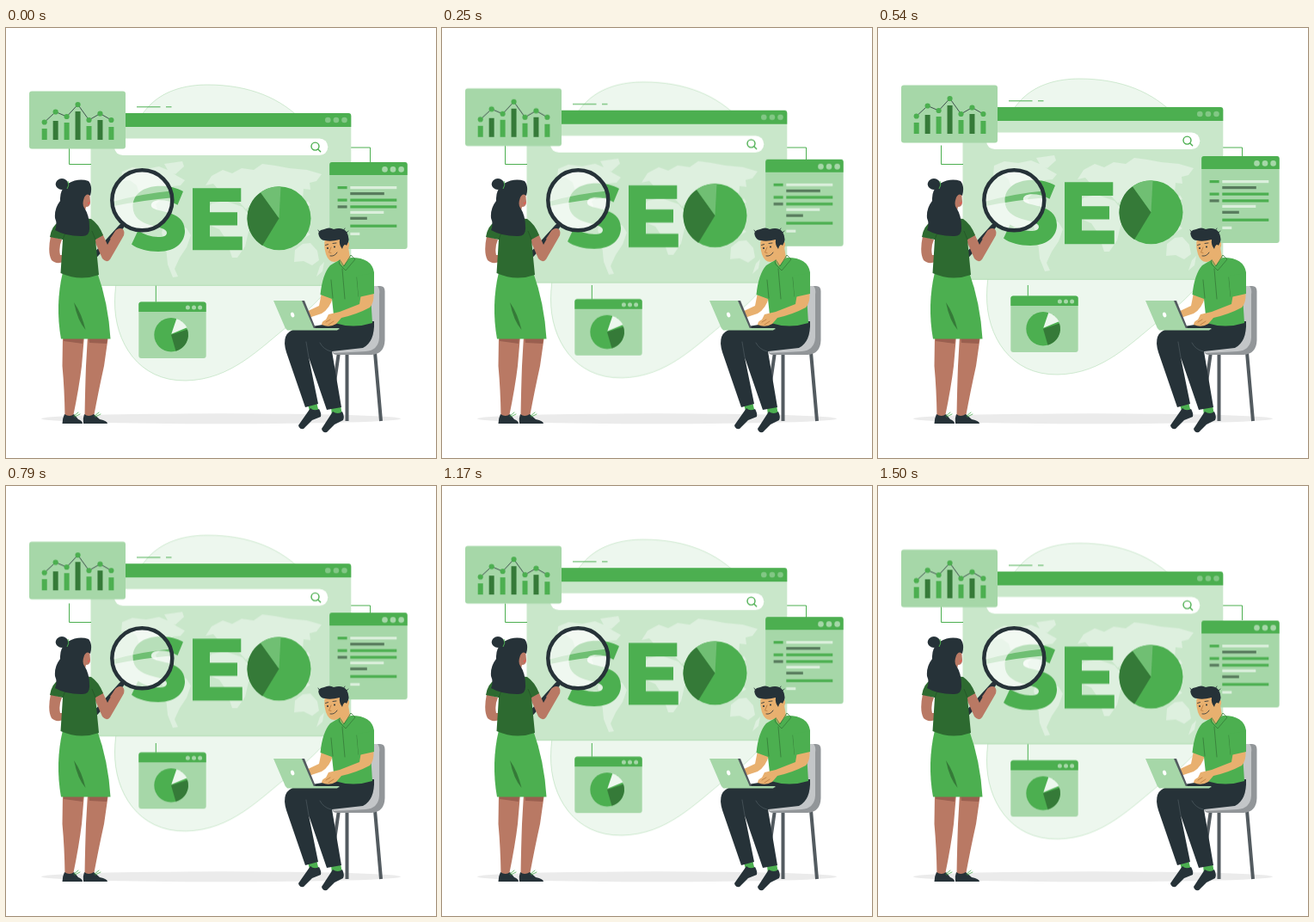
Recreate the animation shown at these times as an HTML page. Size 500x500 px, loop 1.54 s.

```html
<!DOCTYPE html>
<html lang="en">
<head>
<meta charset="utf-8">
<title>Search analytics</title>
<style>
html, body { margin: 0; width: 100%; height: 100%; overflow: hidden; background: #fff; }
svg { display: block; width: 100vw; height: 100vh; }
.float { animation: float 1540ms linear infinite; }
@keyframes float {
  0% { transform: translateY(0); }
  47.4% { transform: translateY(-9.5px); }
  97.4% { transform: translateY(.5px); }
  100% { transform: translateY(0); }
}
.g { fill: #4caf50; }
.d { fill: #357a38; }
.card { fill: #a6d7a8; }
.ink { fill: #263238; }
.skin { fill: #b97964; }
.tan { fill: #e8b06f; }
.dots { fill: #82c785; }
.line { fill: none; stroke: #4caf50; stroke-width: 1; }
.icon { fill: none; stroke: #4caf50; stroke-width: 1.4; stroke-linecap: round; }
.thin { fill: none; stroke-width: .8; stroke-linecap: round; stroke-linejoin: round; }
</style>
</head>
<body>
<svg viewBox="0 0 500 500">
  <defs>
    <clipPath id="lens"><circle cx="158.300" cy="200.300" r="35"/></clipPath>
  </defs>
  <ellipse cx="250" cy="454.300" rx="209" ry="6" fill="#ebebeb"/>

  <g class="float">
    <path fill="#edf7ee" stroke="#a6d7a8" stroke-width=".5" d="M234 66C284 66 320 82 346 109C375 140 404 185 401 238C399 283 368 316 331 344C294 373 262 409 209 410C154 411 126 365 126.500 318C127 270 148 236 142 190C137 145 144 112 169 88C186 72 210 66 234 66Z"/>
    <path class="line" d="M152 91.800H179.500M186 91.800H192.500"/>
  </g>

  <path class="line" d="M174.300 299V322M400 139H423.500V156"/>

  <g class="float">
    <rect x="98.500" y="102" width="302.800" height="197.500" fill="#c9e7ca"/>
    <path d="M98.500 299.300H401.300" stroke="#a6d7a8" stroke-width=".7"/>
    <path class="g" d="M98.500 115V102Q98.500 99 101.500 99H398.300Q401.300 99 401.300 102V115Z"/>
    <g class="dots"><circle cx="374.300" cy="107" r="3.300"/><circle cx="383.900" cy="107" r="3.300"/><circle cx="393.500" cy="107" r="3.300"/></g>
    <g fill="#def0df">
      <path d="M135 167L147 162L163 164L178 161L190 166L199 172L208 177L203 183L194 184L188 193L180 200L174 205L177 213L185 219L181 222L170 215L163 205L156 196L152 183L144 177L134 178ZM184 158L205 155L207 161L197 170L189 167Z"/>
      <path d="M185 222L197 224L210 233L215 241L210 255L202 267L196 280L200 289L194 290L188 275L186 255L181 238Z"/>
      <path d="M232 183L239 172L252 165L263 169L274 163L288 165L298 158L313 160L329 163L350 165L367 170L361 178L353 180L354 188L346 187L345 199L336 205L331 215L323 220L316 209L308 213L303 224L295 210L285 205L279 211L271 202L259 201L250 195L239 200L236 193L247 188L241 181Z"/>
      <path d="M239 204L255 201L275 208L285 220L292 221L282 237L278 254L269 267L263 267L256 246L248 234L236 229L232 216Z"/>
      <path d="M336 258L345 251L354 250L362 259L364 270L356 276L346 271L335 272ZM365 277L370 272L368 283L361 289ZM326 232L335 236L345 233L354 240L347 244L334 241ZM346 210L351 201L354 206Z"/>
    </g>
    <rect x="126" y="128.500" width="248.300" height="19.600" rx="9.800" fill="#fff"/>
    <g class="icon"><circle cx="359.500" cy="137.600" r="4.500"/><path d="M362.800 140.900L365.700 143.700"/></g>
    <path class="g" d="M177 260C165 260 153 257 146 251.500L153.500 235.500C160 240 169 243 177 243C184.500 243 187 241 187 238C187 228 147.500 234 147.500 207.500C147.500 194.500 158 183.700 180 183.700C189.500 183.700 198.500 185.700 206 190L199.500 205.800C193 202 186 200.300 179.700 200.300C171.500 200.300 168.800 203 168.800 206.300C168.800 216 208 209 208 236C208 248.500 198 260 177 260ZM217 186.300H273.300V202H237V214.300H269V229.500H237V242.500H274.800V258.300H217Z"/>
    <circle class="g" cx="317.500" cy="221.300" r="37"/>
    <path class="d" d="M317.500 221.300L296 191.200A37 37 0 0 0 298.200 252.900Z"/>
    <path fill="#70bf73" d="M317.500 221.300L296 191.200A37 37 0 0 1 319.500 184.400Z"/>
  </g>

  <path class="line" d="M73.500 136.500V158.500H99"/>

  <g class="float">
    <rect class="card" x="27" y="73.500" width="112" height="67" rx="3"/>
    <g id="chart"></g>

    <rect class="card" x="376.200" y="156" width="90.500" height="101" rx="3"/>
    <path class="g" d="M376.200 171V159Q376.200 156 379.200 156H463.700Q466.700 156 466.700 159V171Z"/>
    <g fill="#a6d7a8"><circle cx="440.500" cy="164.400" r="3.300"/><circle cx="450" cy="164.400" r="3.300"/><circle cx="459.600" cy="164.400" r="3.300"/></g>
    <g id="rows"></g>

    <rect class="card" x="154.300" y="318.500" width="78.400" height="65.500" rx="3"/>
    <path class="g" d="M154.300 330V321.500Q154.300 318.500 157.300 318.500H229.700Q232.700 318.500 232.700 321.500V330Z"/>
    <g fill="#a6d7a8"><circle cx="211.400" cy="325" r="2.500"/><circle cx="218.500" cy="325" r="2.500"/><circle cx="225.600" cy="325" r="2.500"/></g>
    <circle class="g" cx="192" cy="356.800" r="19.700"/>
    <path class="d" d="M192 356.800L211 350.500A19.700 19.700 0 0 1 197.500 375.700Z"/>
    <path fill="#edf7ee" d="M192.300 355.800L198.300 338Q206 340.500 210.500 348.300Z"/>
  </g>

  <!-- woman -->
  <path class="skin" d="M66 358H91L88 393Q85 418 78 452H68.500Q68 420 65.500 393ZM95 358H119L114 393Q108 420 102 452H91.500Q92 420 93 393Z"/>
  <path fill="#9a5f4f" d="M67 360H90L89 367L67 364ZM96 360H118L117 367L97 366Z"/>
  <path class="ink" d="M68 449Q74 453 79 449L84 455Q89 457 89 460H65.500Q65.500 454 68 449ZM91 449Q96 453 102 449L109 455Q118 457 118 460H90Q89 454 91 449Z"/>
  <path class="thin" stroke="#4caf50" d="M79 451L84 447M80 452L86 449M103 451L108 447M104 452L110 449"/>
  <path class="g" d="M66 284H106Q119 320 121.500 361.500H64Q57 322 66 284Z"/>
  <path class="d" d="M79 319Q88 332 92.500 351Q83 340 79 319Z"/>
  <path class="skin" d="M52 242L65 246Q61 255 63 264L67 264V272Q58 275 53 270Q48 261 52 242Z"/>
  <path d="M134 231L104 264" stroke="#263238" stroke-width="6" stroke-linecap="round"/>
  <path class="skin" d="M101 243L112 239L118 252L127 236Q132 231 136 234Q139 238 136 243L121 269Q117 274 112 268Z"/>
  <path fill="#2d6a30" d="M62 225Q80 219 99 222Q108 228 113 241L104 246L108 287Q86 295 63.500 285L66 246L51 243Q53 230 62 225Z"/>
  <path fill="none" stroke="#245427" stroke-width=".8" d="M66 246L69 238M104 246L100 236"/>
  <path class="skin" d="M84 190L97 190L98 202Q98 208 93 208L90 222H80Z"/>
  <path fill="#e05a52" d="M94.500 203L98 202.500L96 205.500Z"/>
  <path class="ink" d="M72 181Q84 174 96 178Q101 184 98 195Q94 191 91 197Q88 205 91 209Q97 218 97 231Q98 243 87 242Q69 242 57 235Q60 228 57 221Q56 210 63 201Q62 188 72 181Z"/>
  <ellipse class="ink" cx="65" cy="181.500" rx="7.300" ry="6.500"/>
  <path class="line" d="M72 178Q74 183 71 187"/>

  <!-- magnifier: two glare areas leave a clearer band between them -->
  <g clip-path="url(#lens)" fill="#fff">
    <circle cx="158.300" cy="200.300" r="35" fill-opacity=".2"/>
    <path fill-opacity=".5" d="M120 160H198V189Q160 192 120 203Z"/>
    <path fill-opacity=".64" d="M120 208Q160 200 198 197V240H120Z"/>
  </g>
  <circle cx="158.300" cy="200.300" r="35" fill="none" stroke="#263238" stroke-width="4.500"/>
  <path class="skin" d="M121 245L128 235Q134 231 136 236L131 246Q126 251 121 245Z"/>

  <!-- chair -->
  <path fill="none" stroke="#535b60" stroke-width="4" d="M396.500 377V457M429 377L436 457M387 377L382 412"/>
  <path fill="#929699" d="M427 300H435Q440.500 300 440.500 306V363Q440 379 425 380H385Q379 380 379 374H420Q428 373 428 360Z"/>
  <path fill="#c3c6c8" d="M427 300H432Q435 303 434 310V360Q433 375 418 376L381 378L379 374Z"/>

  <!-- man -->
  <path class="g" d="M351 438L361 435L364 447L354 449ZM378 441L389 439L391 450L379 451Z"/>
  <path class="ink" d="M354 442Q358 446 364 443Q367 448 366 452L356 456L346 466Q341 467 340 462ZM380 446Q386 450 391 446Q394 452 392 456L382 461L373 470Q368 471 367 466Z"/>
  <path class="ink" d="M381 343L428 341Q429 365 415 372L379 376L390 441L373 444L352 383L363 437L348 441L326 377Q319 354 337 350Z"/>
  <path class="thin" stroke="#4a565c" d="M378 376Q369 374 365 366M352 383L349 365"/>
  <path class="tan" d="M367 308L380 313Q377 326 367 332L352 337L347 331L364 323Z"/>
  <path class="g" d="M387 270L402 267Q425 267 428 284V308L424 311L426 343Q404 350 382 343L379 315L365.500 310Q368 286 377 276Z"/>
  <path class="thin" stroke="#357a38" d="M380 314L378 293M410 312L408 290M391 280L394 315"/>
  <path class="tan" d="M386 258L398 255L400 267L392 277Q388 273 387 267Z"/>
  <path class="thin" stroke="#357a38" d="M387 268L393 277L401 264L406 269L395 282L388 275Z"/>
  <path class="tan" d="M371 245Q381 239 394 243L399 250Q400 257 394 258Q391 271 382 272Q375 272 372 263Q369 253 371 245Z"/>
  <path class="ink" d="M364 242Q361 235 370 234Q376 231 381 234Q391 231 396 237Q401 246 396 253Q393 250 391 257Q387 252 388 246Q377 249 371 247Q366 247 364 242Z"/>
  <circle class="ink" cx="374" cy="256" r="1"/><circle class="ink" cx="382" cy="254.500" r="1"/>
  <path class="thin" stroke="#263238" d="M371.500 252.500L374.500 251.500M380 250.500L384 250M377 265Q382 266 385 261"/>
  <path class="thin" stroke="#b97a3f" d="M378 255L375.500 261L378 261.500"/>
  <path class="thin" stroke="#263238" d="M365 238L363 235M392 236L394 233M395 239L398 236"/>
  <path fill="#535b60" d="M343 317H347L360 349L386 349L388 351H354Z"/>
  <path class="card" d="M311 317H344L358 349.500H325ZM325 349H388L385 351.500H327Z"/>
  <ellipse cx="333" cy="333.500" rx="2" ry="3" fill="#fff" transform="rotate(-20 333 333)"/>
  <path class="tan" d="M413 309L427.500 308Q428 320 423 325Q408 333 390 337L384 344Q376 349 367 345Q367 341 372 339L375 333L388 330L411 321Z"/>
  <path class="g" d="M408 288L428 285V309L410 313Z"/>
  <path class="thin" stroke="#b97a3f" d="M372 342L377 339M375 345L381 341"/>
</svg>
<script>
const put = (id, html) => document.getElementById(id).innerHTML = html;
const bar = (x, y, w, h, fill) => `<rect x="${x}" y="${y}" width="${w}" height="${h}" fill="${fill}"/>`;
const green = '#4caf50', dark = '#357a38', pale = '#dbefdc', grey = '#587b5d';

// bar top and curve height per column
const cols = [[117, 109.5], [108, 97.5], [110, 103], [97, 89], [114, 107], [107, 99.5], [115, 107]];
const colX = i => 44.7 + i * 12.95;
const curve = cols.map(([, y], i) => `${colX(i)},${y}`).join(' ');
put('chart',
  cols.map(([top], i) => bar(colX(i) - 3, top, 6, 130 - top, i % 2 ? dark : green)).join('') +
  `<polyline class="thin" stroke="#263238" points="${curve}"/>` +
  cols.map(([, y], i) => `<circle class="g" cx="${colX(i)}" cy="${y}" r="3.1"/>`).join(''));

// y, width, colour, optional label colour
const rows = [
  [184, 54, pale, green], [191, 39.5, grey], [198.5, 54, green, green], [206.3, 54, green, grey],
  [212.8, 39, pale], [219.7, 19.5, grey], [228.6, 54, green], [237.8, 11, pale]
];
put('rows', rows.map(([y, w, fill, label]) =>
  bar(400.3, y, w, 3.2, fill) + (label ? bar(385.6, y, 11, 3.2, label) : '')).join(''));
</script>
</body>
</html>
```
